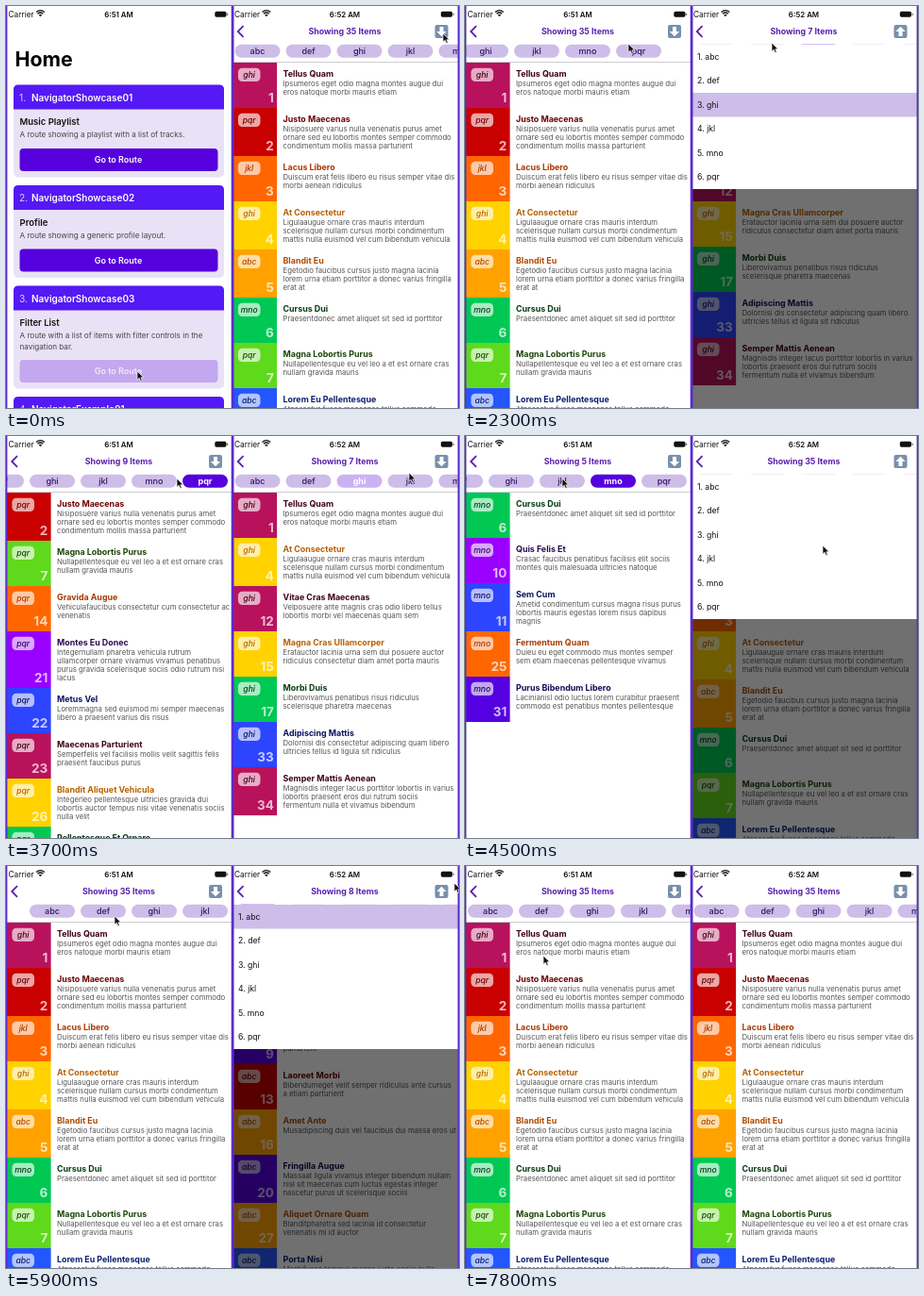
Recreate the animation shown at these times as an HTML page. Size 480 by 426 pixels, loop 7.9 s.

```html
<!DOCTYPE html>
<html lang="en">
<head>
<meta charset="utf-8">
<title>Filter list demo</title>
<style>
html, body { margin: 0; width: 100%; height: 100%; overflow: hidden; background: #fff; }
svg { display: block; font-family: Inter, Roboto, "Liberation Sans", sans-serif; }
text { white-space: pre; }
</style>
</head>
<body>
<svg id="stage" width="480" height="426" viewBox="0 0 480 426"></svg>
<script>
const LOOP = 7900, STEP = 100;
const VIOLET = '#5500dd', LAVENDER = '#cdbde8', TITLE = '#5a1fb0';
const GROUPS = ['abc', 'def', 'ghi', 'jkl', 'mno', 'pqr'];

// Tile colour and matching dark text colour, repeating every 11 items.
const PALETTE = [
  ['#b8125c', '#3d0014'], ['#c80000', '#6b0000'], ['#ff6600', '#a83800'], ['#ffd200', '#b86000'],
  ['#ffa200', '#b04a00'], ['#00c853', '#063b12'], ['#5fd91b', '#1c4508'], ['#2456ff', '#0b1f70'],
  ['#5500e0', '#150a50'], ['#9900ff', '#2a0a50'], ['#2e45ff', '#0a1060']
];

const ITEMS = `ghi|Tellus Quam|Ipsumeros eget odio magna montes augue dui/eros natoque morbi mauris etiam
pqr|Justo Maecenas|Nisiposuere varius nulla venenatis purus amet/ornare sed eu lobortis montes semper commodo/condimentum mollis massa parturient
jkl|Lacus Libero|Duiscum erat felis libero eu risus semper vitae dis/morbi aenean ridiculus
ghi|At Consectetur|Ligulaaugue ornare cras mauris interdum/scelerisque nullam cursus morbi condimentum/mattis nulla euismod vel cum bibendum vehicula
abc|Blandit Eu|Egetodio faucibus cursus justo magna lacinia/lorem urna etiam porttitor a donec varius fringilla/erat at
mno|Cursus Dui|Praesentdonec amet aliquet sit sed id porttitor
pqr|Magna Lobortis Purus|Nullapellentesque eu vel leo a et est ornare cras/nullam gravida mauris
abc|Lorem Eu Pellentesque|Atnascetur fusce maecenas tellus commodo/tortor adipiscing mi posuere magna malesuada/dapibus
abc|Libero Amet Id|Ipsumlobortis mus sem pellentesque venenatis/parturient
mno|Quis Felis Et|Crasac faucibus penatibus facilisis elit sociis/montes quis malesuada ultricies natoque
mno|Sem Cum|Ametid condimentum cursus magna risus purus/lobortis mauris egestas lorem risus dapibus/magnis
ghi|Vitae Cras Maecenas|Velposuere ante magnis cras odio libero tellus/lobortis morbi vel maecenas quam sem
abc|Laoreet Morbi|Bibendumeget velit semper ridiculus ante cursus/a etiam parturient
pqr|Gravida Augue|Vehiculafaucibus consectetur cum consectetur ac/venenatis
ghi|Magna Cras Ullamcorper|Eratauctor lacinia urna sem dui posuere auctor/ridiculus consectetur diam amet porta mauris
abc|Amet Ante|Musadipiscing duis vel faucibus dui massa eros ut
ghi|Morbi Duis|Liberovivamus penatibus risus ridiculus/scelerisque pharetra maecenas
jkl|Varius Nibh|Semperodio lectus magna porta ligula/vitae natoque
def|Turpis Leo|Etiamsed justo amet donec
abc|Fringilla Augue|Massaat ligula vivamus integer bibendum nullam/nisl sit maecenas cum luctus egestas integer/nascetur purus ut scelerisque sociis
pqr|Montes Eu Donec|Integernullam pharetra vehicula rutrum/ullamcorper ornare vivamus vivamus penatibus/purus gravida scelerisque sociis odio rutrum nisi/lacus
pqr|Metus Vel|Loremmagna sed euismod mi semper maecenas/libero a praesent varius dis risus
pqr|Maecenas Parturient|Semperfelis vel facilisis mollis velit sagittis felis/praesent faucibus purus
jkl|Donec Mollis|Portaid tellus ornare risus quam
mno|Fermentum Quam|Duieu eu eget commodo mus montes semper/sem etiam maecenas pellentesque vivamus
pqr|Blandit Aliquet Vehicula|Integerleo pellentesque ultricies gravida dui/lobortis auctor tempus nisi vitae venenatis sociis/nulla velit
abc|Aliquet Ornare Quam|Blanditpharetra sed lacinia id consectetur/venenatis mi id auctor
pqr|Pellentesque Et Ornare|Cursusmagna sed amet lectus
jkl|Sociis Urna|Risusvel montes lacus integer ante
abc|Porta Nisi|Morbifusce tempus magna justo sociis nulla
mno|Purus Bibendum Libero|Lacinianisl odio luctus lorem curabitur praesent/commodo est penatibus montes pellentesque
def|Ante Felis|Ligulaid massa quam
ghi|Adipiscing Mattis|Dolornisi dis consectetur adipiscing quam libero/ultricies tellus id ligula sit ridiculus
ghi|Semper Mattis Aenean|Magnisdis integer lacus porttitor lobortis in varius/lobortis praesent eros dui rutrum sociis/fermentum nulla et vivamus bibendum
pqr|Velit Nec|Ametsem justo porta`.split('\n').map((row, i) => {
  const [group, title, body] = row.split('|');
  const [tile, ink] = PALETTE[i % PALETTE.length];
  return { number: i + 1, group, title, lines: body.split('/'), tile, ink };
});

// Taps: [time, control, selection afterwards].
const LEFT = {
  taps: [[1000, 'abc', 'abc'], [1700, 'abc', ''], [3000, 'pqr', 'pqr'], [4200, 'mno', 'mno'],
    [4700, 'jkl', 'jkl'], [5200, 'jkl', '']],
  scroll: [[1900, 0], [2300, 113], [2600, 86], [5500, 86], [5900, -22], [6200, 0]],
  cursor: [[0, 139, 387], [300, 139, 387], [900, 33, 45], [1700, 33, 45], [1900, 215, 42], [2300, 173, 40],
    [2800, 212, 46], [3200, 212, 46], [3700, 181, 45], [4000, 157, 46], [4200, 157, 46], [4500, 103, 45],
    [5300, 103, 45], [5500, 30, 48], [5900, 115, 53], [7000, 90, 85], [7800, 83, 95]]
};
const RIGHT = {
  taps: [[200, 'menu', ''], [600, '', 'abc'], [1600, '', 'ghi'], [2600, 'menu', 'ghi'], [3800, 'ghi', ''],
    [4100, 'menu', ''], [5200, '', 'abc'], [6100, 'menu', 'abc'], [7000, 'abc', '']],
  menu: [[200, 0], [400, 1], [2600, 1], [2800, 0], [4100, 0], [4300, 1], [6100, 1], [6300, 0]],
  cursor: [[0, 463, 29], [200, 463, 29], [500, 300, 50], [600, 300, 50], [1000, 334, 162], [1500, 322, 103],
    [1700, 322, 103], [2300, 325, 39], [2600, 462, 28], [2800, 462, 28], [3400, 376, 46], [3600, 376, 46],
    [3700, 427, 39], [4000, 462, 28], [4100, 462, 28], [4500, 379, 116], [5000, 300, 51], [5300, 300, 51],
    [5900, 475, 18], [6100, 463, 27], [6700, 267, 46], [7100, 267, 46], [7600, 500, 110]]
};

const clamp = v => Math.max(0, Math.min(1, v));
const ease = v => v * v * (3 - 2 * v);

function track(keys, t) {
  const next = keys.findIndex(k => k[0] > t);
  if (next < 0) return keys[keys.length - 1].slice(1);
  if (next === 0) return keys[0].slice(1);
  const a = keys[next - 1], b = keys[next];
  const p = ease((t - a[0]) / (b[0] - a[0]));
  return a.slice(1).map((v, i) => v + (b[i + 1] - v) * p);
}

function pressOpacity(taps, name, t) {
  const d = taps.filter(k => k[1] === name).map(k => t - k[0] + 100).find(d => d >= 0 && d < 400);
  return d === undefined ? 1 : 0.3 + 0.7 * clamp((d - 150) / 250);
}

const selection = (taps, t) => taps.reduce((s, k) => t >= k[0] ? k[2] : s, '');

const text = (x, y, size, fill, content, extra = '') =>
  `<text x="${x}" y="${y}" font-size="${size}" fill="${fill}" ${extra}>${content}</text>`;
const rect = (x, y, w, h, fill, extra = '') =>
  `<rect x="${x}" y="${y}" width="${w}" height="${h}" fill="${fill}" ${extra}/>`;
const shift = (x, y, content, extra = '') => `<g transform="translate(${x} ${y})" ${extra}>${content}</g>`;
const MID = 'text-anchor="middle"', BOLD = 'font-weight="700"', SEMI = 'font-weight="600"';

function statusBar(time) {
  return text(2.5, 12, 8.3, '#111', 'Carrier') +
    shift(-4.8, 0,
      '<path d="M36.8 6.4q4.4-3.7 8.8 0M38.3 8.2q2.9-2.5 5.8 0" fill="none" stroke="#111" stroke-width="1.3"/>' +
      '<path d="M39.5 9.4q1.7-1.2 3.4 0l-1.7 1.8z" fill="#111"/>') +
    text(119.5, 12, 7.9, '#111', time, `${MID} ${SEMI}`) +
    rect(221.3, 5.7, 12.2, 6, '#111', 'rx="1.8"') + rect(234.2, 7.5, 1, 2.4, '#555', 'rx=".5"');
}

function card(y, number, name, title, lines, opacity = 1) {
  const extra = (lines.length - 1) * 11;
  const buttonY = 67.5 + extra;
  return shift(8, y,
    rect(0, 0, 223, 98 + extra, '#e9e2f6', 'rx="5"') +
    '<path d="M0 26V5q0-5 5-5h213q5 0 5 5v21z" fill="#5419f5"/>' +
    text(6, 17, 10.2, '#d9ccff', number + '.') + text(19, 17, 9.95, '#fff', name, SEMI) +
    text(6.5, 42.5, 9.5, '#111', title, SEMI) +
    lines.map((line, i) => text(6.5, 55.5 + i * 11.5, 8.12, '#444', line)).join('') +
    `<g opacity="${opacity}">` + rect(6.5, buttonY, 210, 24, VIOLET, 'rx="4"') +
    text(111, buttonY + 15.2, 9, '#fff', 'Go to Route', `${MID} ${SEMI}`) + '</g>');
}

function home(t) {
  const fade = 0.25 + 0.75 * clamp((t - 150) / 250);
  return rect(0, 0, 240, 426, '#fff') + text(9.5, 64, 21.3, '#000', 'Home', BOLD) +
    card(83.5, 1, 'NavigatorShowcase01', 'Music Playlist', ['A route showing a playlist with a list of tracks.']) +
    card(190, 2, 'NavigatorShowcase02', 'Profile', ['A route showing a generic profile layout.']) +
    card(296.5, 3, 'NavigatorShowcase03', 'Filter List',
      ['A route with a list of items with filter controls in the', 'navigation bar.'], fade) +
    card(414, 4, 'NavigatorExample01', 'Example', ['A route showing an example.']);
}

function itemRow(item, y) {
  const height = Math.max(48, 24 + 9 * item.lines.length);
  const svg = shift(0, y,
    rect(0, 0, 47.6, height, item.tile) +
    rect(6.4, 5.8, 23.6, 14.2, '#fff', 'rx="4.5" opacity=".65"') +
    text(18.2, 16, 8.6, item.ink, item.group, `${MID} font-style="italic" font-weight="500"`) +
    text(44.3, height - 6.5, 13.5, '#fff', item.number, `text-anchor="end" ${BOLD} opacity=".72"`) +
    text(54, 15.2, 8.9, item.ink, item.title, BOLD) +
    item.lines.map((line, i) => text(54, 25 + i * 9, 7.75, '#555', line)).join(''));
  return { svg, height };
}

function itemList(items) {
  let y = 60, out = '';
  for (const item of items) {
    if (y > 426) break;
    const row = itemRow(item, y);
    out += row.svg;
    y += row.height;
  }
  return out;
}

function pills(taps, selected, offset, t) {
  return GROUPS.map((name, i) => {
    const on = name === selected;
    return shift(27 + i * 54 - offset, 47.8,
      rect(-24, -7, 48, 14, on ? VIOLET : LAVENDER, 'rx="7"') +
      text(0, 3.1, 9, on ? '#fff' : '#321463', name, `${MID} font-weight="${on ? 700 : 500}"`),
      `opacity="${pressOpacity(taps, name, t)}"`);
  }).join('');
}

function menuButton(up, opacity) {
  return shift(222, 27,
    rect(-7, -7, 14, 14, '#7890ab', 'rx="2"') +
    `<path d="M-2-5h4v5h3.2L0 5.2-5.2 0H-2z" fill="#fff" ${up ? 'transform="scale(1 -1)"' : ''}/>`,
    `opacity="${opacity}"`);
}

function dropdown(open, selected) {
  if (open <= 0) return '';
  const rowHeight = 25.5;
  const rows = GROUPS.map((name, i) =>
    (name === selected ? rect(0, i * rowHeight, 240, rowHeight, LAVENDER) : '') +
    text(6.4, i * rowHeight + 15.8, 8.7, '#111', `${i + 1}. ${name}`)).join('');
  return rect(0, 41, 240, 385, '#000', `opacity="${0.56 * open}"`) +
    '<svg y="41" width="240" height="153">' +
    shift(0, -153 * (1 - open), rect(0, 0, 240, 153, '#fff') + rows) + '</svg>';
}

function filterScreen(phone, t) {
  const selected = selection(phone.taps, t);
  const items = selected ? ITEMS.filter(item => item.group === selected) : ITEMS;
  const offset = phone.scroll ? track(phone.scroll, t)[0] : 0;
  const open = phone.menu ? track(phone.menu, t)[0] : 0;
  return rect(0, 0, 240, 426, '#fff') + itemList(items) +
    rect(0, 59, 240, 0.8, '#c4c0cc') + pills(phone.taps, selected, offset, t) +
    dropdown(open, selected) +
    '<path d="M12 21.2 6.2 27l5.8 5.8" fill="none" stroke="#5a1fb0" stroke-width="1.8"/>' +
    text(119.5, 30.2, 8.85, TITLE, `Showing ${items.length} Items`, `${MID} ${BOLD}`) +
    menuButton(open > 0.5, pressOpacity(phone.taps, 'menu', t));
}

function pointer(keys, t) {
  const [x, y] = track(keys, t);
  return shift(x, y, '<path d="M0 0V9.2L2.2 7.3 3.7 10.6 5.3 9.9 3.9 6.7H6.8Z" fill="#111" stroke="#fff" stroke-width=".7"/>');
}

function leftScreen(t) {
  const push = ease(clamp((t - 100) / 500));
  if (push >= 1) return filterScreen(LEFT, t);
  return shift(-75 * push, 0, home(t)) + rect(0, 0, 240, 426, '#000', `opacity="${0.1 * push}"`) +
    (push > 0 ? shift(240 * (1 - push), 0, filterScreen(LEFT, t)) : '');
}

const phoneFrame = (x, content) => `<svg x="${x}" width="240" height="426">${content}</svg>`;
const stage = document.getElementById('stage');

function render(t) {
  stage.innerHTML =
    phoneFrame(0, leftScreen(t) + statusBar('6:51 AM')) +
    phoneFrame(239.5, filterScreen(RIGHT, t) + statusBar('6:52 AM')) +
    rect(0, 0, 1.4, 426, '#5b2bd0') + rect(238.7, 0, 2.8, 426, '#5b2bd0') + rect(478.6, 0, 1.4, 426, '#5b2bd0') +
    pointer(LEFT.cursor, t) + pointer(RIGHT.cursor, t);
}

const start = performance.now();
let shown = -1;
function tick() {
  const t = Math.floor(((performance.now() - start) % LOOP) / STEP) * STEP;
  if (t !== shown) render(shown = t);
  requestAnimationFrame(tick);
}
tick();
</script>
</body>
</html>
```
